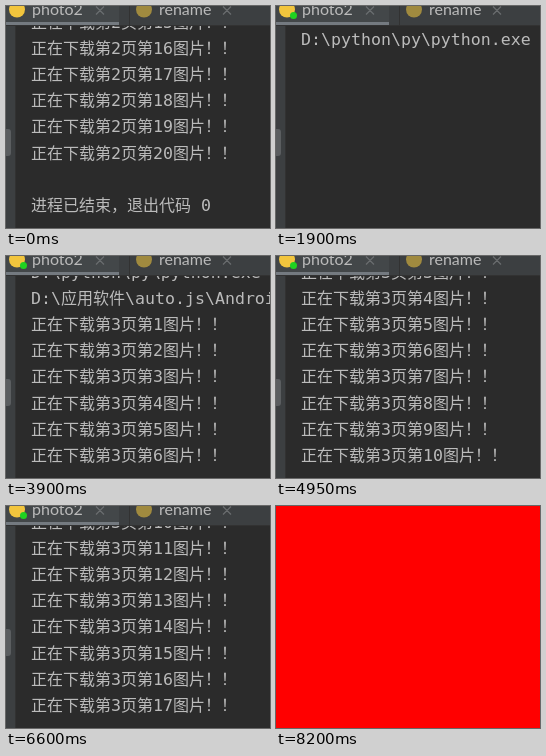
An HTML page that plays this animation: 264 px wide and 222 px high, repeating every 8.25 s.

```html
<!DOCTYPE html>
<html lang="zh-CN">
<head>
<meta charset="utf-8">
<title>Console output</title>
<style>
  html, body { margin: 0; width: 100%; height: 100%; overflow: hidden; background: #2b2b2b; }
  svg { display: block; width: 264px; height: 222px; }
  text { white-space: pre; fill: #bbb; }
  .mono { font: 16.6px "DejaVu Sans Mono", "Noto Sans Mono", monospace; }
  .han { font: 300 16px "Noto Sans CJK SC", "Noto Sans CJK", sans-serif; }
  .tab { font: 16px Lato, "Open Sans", sans-serif; }
  .close { stroke: #6a6d6f; stroke-width: 1.2; fill: none; }
</style>
</head>
<body>
<svg viewBox="0 0 264 222">
  <rect width="264" height="222" fill="#2b2b2b"/>
  <g id="console"></g>

  <rect y="19" width="9" height="203" fill="#3c3f41"/>
  <rect x="9" y="19" width="1" height="203" fill="#323232"/>
  <rect x="-4" y="123" width="9" height="27" rx="3" fill="#5b5e60"/>

  <rect width="264" height="19" fill="#3c3f41"/>
  <rect width="113" height="16" fill="#434749"/>
  <rect x="123" width="1" height="19" fill="#323232"/>
  <rect y="16" width="113" height="3" fill="#747a80"/>
  <rect y="19" width="264" height="1" fill="#323232"/>
  <circle cx="11" cy="3.5" r="8" fill="#f2c53d"/>
  <circle id="running" cx="17.5" cy="9.5" r="3.5" fill="#21d321"/>
  <circle cx="138" cy="3.5" r="8" fill="#a08a3f"/>
  <text class="tab" x="26" y="9">photo2</text>
  <text class="tab" x="153" y="9">rename</text>
  <path class="close" d="M90 0.5l8 8m0-8l-8 8M217 0.5l8 8m0-8l-8 8"/>

  <rect id="flash" width="264" height="222" fill="#f00"/>
</svg>
<script>
const LOOP = 8250, START = 1550, COMMAND = 1700, SCRIPT = 2000;
const EXIT = 7500, IDLE = 8000, FLASH = 8200;
const PITCH = 26.2, TOP = 39, BOTTOM = 205;

// Moments at which each download line is printed
const PRINTS = [2400, 2700, 3000, 3300, 3600, 3900, 4100, 4450, 4700, 4900,
                5250, 5500, 5750, 5950, 6200, 6400, 6550, 6900, 7150, 7400];

const $ = id => document.getElementById(id);
const show = (id, on) => $(id).setAttribute("visibility", on ? "visible" : "hidden");

function linesAt(t) {
  const old = t < START;
  const count = old ? PRINTS.length : PRINTS.filter(p => t >= p).length;
  const lines = [];
  if (old || t >= COMMAND) lines.push("D:\\python\\py\\python.exe");
  if (old || t >= SCRIPT) lines.push("D:\\应用软件\\auto.js\\Android");
  for (let i = 1; i <= count; i++) lines.push(`正在下载第${old ? 2 : 3}页第${i}图片！！`);
  if (old || t >= EXIT) lines.push("", "进程已结束，退出代码 0");
  return lines;
}

// Latin and Han runs use different fonts and sizes
function runs(line) {
  return line.match(/[\x20-\x7e]+|[^\x20-\x7e]+/g)
    .map(s => `<tspan class="${s.charCodeAt(0) < 127 ? "mono" : "han"}">${s}</tspan>`)
    .join("");
}

function drawLines(lines) {
  const scroll = Math.max(0, TOP + (lines.length - 1) * PITCH - BOTTOM);
  $("console").innerHTML = lines.map((line, i) => {
    const y = Math.round(TOP + i * PITCH - scroll);
    return line && y > 0 ? `<text x="25" y="${y}">${runs(line)}</text>` : "";
  }).join("");
}

let last = null;
function render(t) {
  const lines = linesAt(t), key = lines.join("\n");
  if (key !== last) {
    drawLines(lines);
    last = key;
  }
  show("running", t >= START && t < IDLE);
  show("flash", t >= FLASH);
}

let begin = null;
function tick(now) {
  if (begin === null) begin = now;
  render((now - begin) % LOOP);
  requestAnimationFrame(tick);
}
render(0);
requestAnimationFrame(tick);
</script>
</body>
</html>
```
